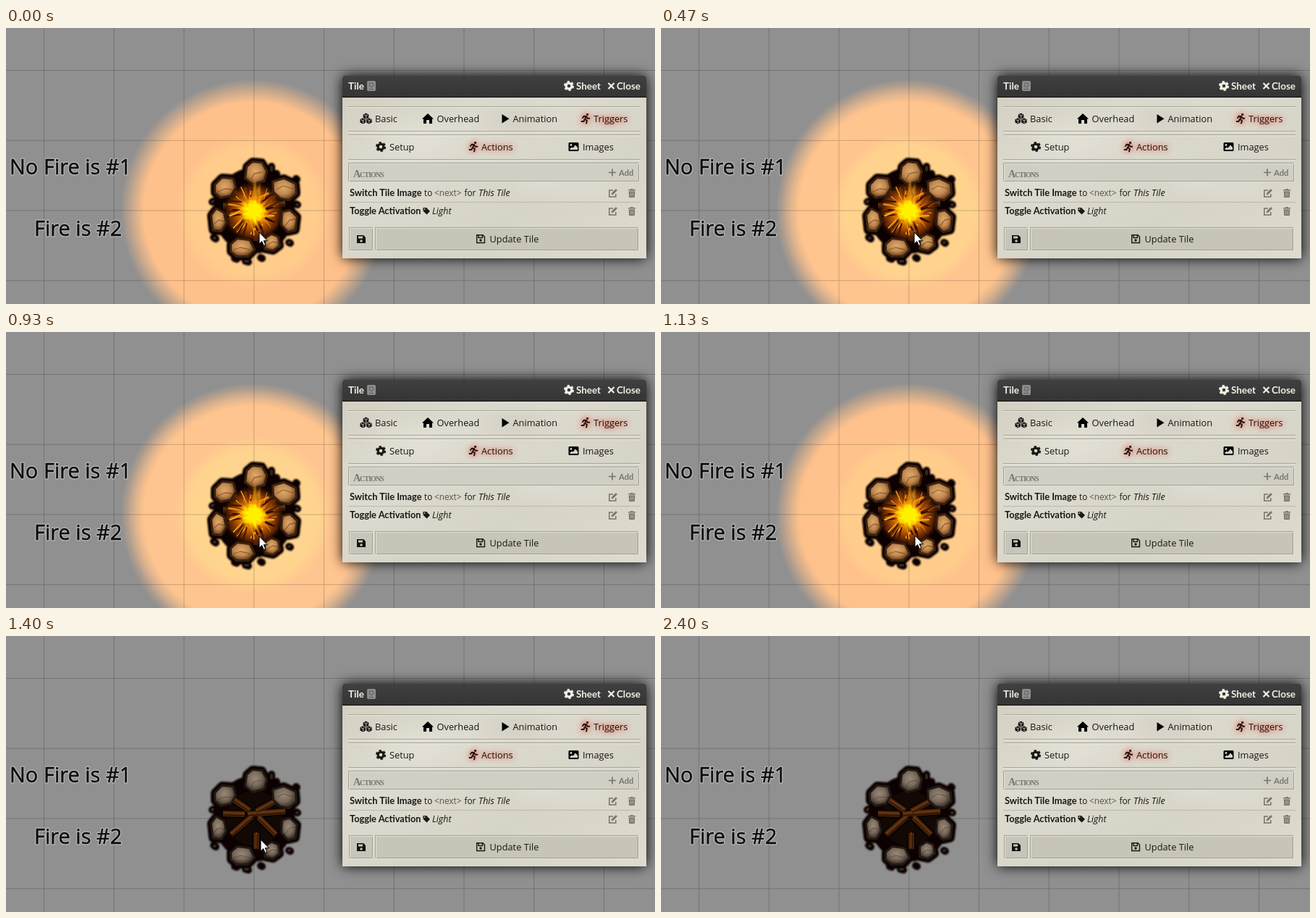
An HTML page for the animation above (3270 ms loop, 897x381 px).

```html
<!DOCTYPE html>
<html lang="en">
<head>
<meta charset="utf-8">
<title>Campfire tile</title>
<style>
html, body { margin: 0; width: 100%; height: 100%; overflow: hidden; background: #909090; }
svg { display: block; width: 897px; height: 381px; }
text { font: 12.8px "Open Sans", "Noto Sans", sans-serif; fill: #191813; white-space: pre; }
#words text { font-size: 29px; fill: inherit; }
.halo { fill: #c8c8c8; stroke: #c8c8c8; stroke-width: 3px; stroke-linejoin: round; opacity: .75; }
.ink { fill: #0e0e0e; stroke: #0e0e0e; stroke-width: .5px; }
.bold { font: 700 12.8px Lato, "Open Sans", sans-serif; }
.head text { font-size: 13.4px; fill: #f0f0e4; }
.row { font-size: 11.8px; }
.ital { font-size: 12.4px; font-style: italic; }
.soft { fill: #55534b; }
.caps { font: 700 14px "Liberation Serif", serif; font-variant: small-caps; letter-spacing: -1px; fill: #78766b; }
.add { font-size: 11.2px; fill: #78766b; }
.glow { filter: drop-shadow(0 0 4px #f21800); }
.line { fill: none; stroke: currentColor; }

.lit, .pulse, .cursor { animation: lit 3270ms step-end infinite; }
.pulse { animation-name: pulse; }
.cursor { animation-name: point; }
@keyframes lit { 0% { opacity: 1; } 42.75%, 100% { opacity: 0; } }
@keyframes pulse {
  0% { opacity: .12; animation-timing-function: steps(7); }
  14.3% { opacity: .52; animation-timing-function: steps(4); }
  22.25% { opacity: 1; animation-timing-function: steps(6); }
  34.5% { opacity: .16; animation-timing-function: steps(4); }
  42.75%, 100% { opacity: 0; }
}
@keyframes point {
  0% { transform: translate(350px, 282px); }
  34.5% { transform: translate(351px, 281px); }
  42.75% { transform: translate(352px, 281px); }
  63.25% { transform: translate(345px, 287px); }
  65.1% { transform: translate(327px, 297px); }
  67.2% { transform: translate(289px, 315px); }
  69.35% { transform: translate(231px, 341px); }
  71.2% { transform: translate(150px, 372px); }
  73.3%, 100% { transform: translate(-40px, 420px); }
}
</style>
</head>
<body>
<svg viewBox="0 0 897 381">
<defs>
  <pattern id="grid" x="52" y="58" width="96.75" height="96.75" patternUnits="userSpaceOnUse">
    <path d="M0 .5H97M.5 0V97" stroke="#000" stroke-opacity=".2"/>
  </pattern>
  <radialGradient id="far"><stop offset=".82" stop-color="#ffc08a"/><stop offset=".91" stop-color="#ffc08a" stop-opacity=".5"/><stop offset="1" stop-color="#ffc08a" stop-opacity="0"/></radialGradient>
  <radialGradient id="farHot"><stop offset=".8" stop-color="#ffcc98" stop-opacity=".75"/><stop offset=".95" stop-color="#ffcc98" stop-opacity="0"/></radialGradient>
  <radialGradient id="near"><stop offset=".82" stop-color="#ffca8c"/><stop offset="1" stop-color="#ffca8c" stop-opacity="0"/></radialGradient>
  <radialGradient id="nearHot"><stop offset=".82" stop-color="#ffdc90"/><stop offset="1" stop-color="#ffdc90" stop-opacity="0"/></radialGradient>
  <radialGradient id="ember"><stop offset=".15" stop-color="#ffb400"/><stop offset=".5" stop-color="#c96204"/><stop offset=".8" stop-color="#642604" stop-opacity=".9"/><stop offset="1" stop-color="#2a1003" stop-opacity="0"/></radialGradient>
  <radialGradient id="cold" cx=".45" cy=".4" r=".62"><stop stop-color="#988876"/><stop offset=".55" stop-color="#7a6a5b"/><stop offset="1" stop-color="#352b24"/></radialGradient>
  <radialGradient id="warm" cx=".45" cy=".42" r=".64"><stop stop-color="#e0aa6c"/><stop offset=".55" stop-color="#c08850"/><stop offset="1" stop-color="#5a3515"/></radialGradient>
  <linearGradient id="paper" x2="1" y2="1"><stop stop-color="#d3d0c3"/><stop offset=".3" stop-color="#dedbd0"/><stop offset=".65" stop-color="#d6d3c7"/><stop offset="1" stop-color="#dfdccf"/></linearGradient>
  <linearGradient id="bar" x2="0" y2="1"><stop stop-color="#404040"/><stop offset="1" stop-color="#343434"/></linearGradient>
  <filter id="soft"><feGaussianBlur stdDeviation="1.1"/></filter>
  <filter id="faint"><feGaussianBlur stdDeviation="12"/></filter>

  <g id="words">
    <text x="5" y="202">No Fire is #1</text>
    <text x="39" y="287">Fire is #2</text>
  </g>

  <g id="stones">
    <path d="M334 192L341 186 353 187 359 198 356 210 341 214 332 207Z"/>
    <path d="M370 213L384 209 399 216 400 228 391 236 380 234 371 226Z"/>
    <path d="M383 255L392 253 401 261 399 278 390 280 382 271Z"/>
    <path d="M359 291L367 286 375 289 377 300 369 306 359 304Z"/>
    <path d="M312 299L320 292 336 294 342 306 334 314 319 314 312 308Z"/>
    <path d="M285 259L291 251 300 256 303 269 297 279 287 278Z"/>
    <path d="M290 217L299 208 313 209 316 220 310 230 297 233 290 227Z"/>
  </g>
  <path id="cracks" d="M338 210L343 201 354 199M374 223L383 218 397 222M386 273L392 265 400 264M361 300L368 295 377 297M315 306L324 303 337 306M287 271L294 265 302 267M293 226L302 222 313 223"/>
  <path id="logs" d="M300 245L330 246M334 246L386 242M315 226L337 241M374 227L346 242M340 249L311 274M349 250L373 274M346 272V294"/>

  <g id="gear" fill="none" stroke="currentColor">
    <circle r="3.9" stroke-width="3.2"/><circle r="5.8" stroke-width="2.6" stroke-dasharray="3.1 2.97"/>
  </g>
  <g id="run" class="line" stroke-width="1.9" stroke-linecap="round" stroke-linejoin="round">
    <circle cx="2.6" cy="-5.6" r=".7"/>
    <path d="M-4-1L-2.5-3.2 1-3 -.8 1 2 3 1 6.5M-1.4 1.4L-2.6 4H-5.4M1-2.6L2.8-.3H5.3"/>
  </g>
  <path id="hex" d="M0-4L3.8-2V2.2L0 4.2-3.8 2.2V-2Z"/>
  <g id="cube"><use href="#hex" fill="currentColor"/><path d="M-2.2-1.6L0-.5 2.2-1.6M.2 .4V3" fill="none" stroke="#d9d6ca" stroke-width="1"/></g>
  <g id="edit" class="line" stroke-width="1.5">
    <path d="M0-4H-5.2V5H3.8V1"/><path d="M-2 2L-1.5-.3 4-5.6 5.6-4 .2 1.5Z" fill="currentColor" stroke-width=".6"/>
  </g>
  <g id="trash" fill="currentColor"><path d="M-5-5H-2L-1.3-6H1.3L2-5H5V-3.4H-5ZM-4.3-2.6H4.3L3.8 6H-3.8Z"/><path d="M-1.9-1V4.5M0-1V4.5M1.9-1V4.5" stroke="#d9d6ca" stroke-width=".6"/></g>
</defs>

<rect width="897" height="381" fill="#909090"/>

<g class="lit">
  <circle cx="341" cy="253" r="183" fill="url(#far)"/>
  <circle cx="342" cy="253" r="106" fill="url(#near)"/>
</g>
<g class="pulse">
  <circle cx="341" cy="253" r="183" fill="url(#farHot)"/>
  <circle cx="342" cy="253" r="109" fill="url(#nearHot)"/>
</g>
<rect width="897" height="381" fill="url(#grid)"/>

<!-- campfire -->
<g filter="url(#soft)" fill="#080504" stroke="#080504">
  <ellipse cx="343" cy="252" rx="56" ry="59"/>
  <use href="#stones" stroke-width="14" stroke-linejoin="round"/>
  <path d="M367 191V197M374 201V203M331 322L335 323M316 318L319 319M391 296L393 297M352 317L354 318M285 240L287 239M401 243L403 244M287 289L290 291M401 208L402 209" stroke-width="10" stroke-linecap="round"/>
</g>
<path d="M367 192V196M331 322L334 322M391 296L392 296M285 240L286 239M402 244L403 244M288 290L289 290" stroke="#2f241c" stroke-width="4" stroke-linecap="round"/>
<ellipse cx="343" cy="252" rx="39" ry="38" fill="#120905"/>
<use href="#logs" stroke="#080301" stroke-width="12"/>
<use href="#logs" stroke="#452109" stroke-width="8"/>
<use href="#logs" stroke="#66350f" stroke-width="2.5" transform="translate(0 -1)"/>
<use href="#logs" stroke="#231005" stroke-width="1" transform="translate(1 2)"/>

<g class="lit">
  <ellipse cx="342" cy="254" rx="43" ry="42" fill="url(#ember)"/>
  <g id="streaks"></g>
</g>

<g stroke-linejoin="round">
  <use href="#stones" fill="#1f1914" stroke="#1f1914" stroke-width="6"/>
  <use href="#stones" fill="url(#cold)"/>
  <use href="#cracks" fill="none" stroke="#3b3027" stroke-opacity=".45" stroke-width="1.2"/>
</g>
<g class="lit" stroke-linejoin="round">
  <use href="#stones" fill="#39200c" stroke="#39200c" stroke-width="6"/>
  <use href="#stones" fill="url(#warm)"/>
  <use href="#cracks" fill="none" stroke="#6d3f18" stroke-opacity=".6" stroke-width="1.3"/>
  <path d="M339 240L344 207 347 224 351 214 352 240Z" fill="#ffae18" opacity=".6" filter="url(#soft)"/>
  <g id="flame"></g>
</g>

<use href="#words" class="halo"/>
<use href="#words" class="ink"/>

<!-- window -->
<rect x="465" y="66" width="420" height="252" rx="5" fill="#222" style="filter:drop-shadow(0 0 9px #000)"/>
<path d="M465 95H885V318H465Z" fill="url(#paper)"/>
<g filter="url(#faint)" opacity=".35">
  <ellipse cx="560" cy="150" rx="50" ry="18" fill="#eeece2"/>
  <ellipse cx="770" cy="215" rx="70" ry="18" fill="#eeece2"/>
  <ellipse cx="700" cy="125" rx="45" ry="14" fill="#bfbbae"/>
</g>
<path d="M465 96V71Q465 66 470 66H880Q885 66 885 71V96Z" fill="url(#bar)"/>
<path d="M465 95.5H885" stroke="#0c0c0c"/>

<g class="head" color="#f0f0e4">
  <text class="bold" x="473" y="85">Tile</text>
  <rect x="499" y="73" width="12" height="14" rx="2" fill="#8c8c88"/>
  <circle cx="505" cy="78.5" r="2.8" fill="none" stroke="#5c5c58"/>
  <path d="M502 84.5H508" stroke="#5c5c58"/>
  <use href="#gear" x="778" y="80"/>
  <text class="bold" x="788" y="85">Sheet</text>
  <path class="line" d="M832.5 76L840.5 84M840.5 76L832.5 84" stroke-width="2.2"/>
  <text class="bold" x="844" y="85">Close</text>
</g>

<path d="M473 108.5H877M473 142.5H877M473 147.5H877M473 181.5H877" stroke="#a5a296"/>
<path d="M473 109.5H877M473 143.5H877M473 148.5H877M473 182.5H877" stroke="#ebe9df"/>

<g color="#191813">
  <use href="#cube" x="497.5" y="121.5"/><use href="#cube" x="493.2" y="128.3"/><use href="#cube" x="501.8" y="128.3"/>
  <text x="510" y="130">Basic</text>
  <path d="M575 125.5L583 118 591 125.5H589V132H585V127H581V132H577V125.5Z"/>
  <text x="595.5" y="130">Overhead</text>
  <path d="M685.5 119L695.5 125.2 685.5 131.5Z"/>
  <text x="700.5" y="130">Animation</text>
  <g class="glow"><use href="#run" x="801" y="125"/><text x="812" y="130">Triggers</text></g>

  <use href="#gear" x="518" y="164"/>
  <text x="530" y="169">Setup</text>
  <g class="glow"><use href="#run" x="646" y="164"/><text x="657" y="169">Actions</text></g>
  <rect x="777.5" y="158" width="14" height="12" rx="1.5"/>
  <circle cx="781" cy="161.5" r="1.4" fill="#d9d6ca"/>
  <path d="M779.5 168V166.5L782 164.5 783.5 165.8 787 161.5 790 165V168Z" fill="#d9d6ca"/>
  <text x="797" y="169">Images</text>
</g>

<!-- boxes with a grooved edge -->
<g fill="#c7c5b8" stroke="#a19f93">
  <rect x="473.5" y="186.5" width="402" height="26" fill="#d1cfc3"/>
  <rect x="474.5" y="275.5" width="33" height="32"/>
  <rect x="510.5" y="275.5" width="364" height="32"/>
</g>
<g fill="none" stroke="#e6e4da">
  <rect x="474.5" y="187.5" width="400" height="24"/>
  <rect x="475.5" y="276.5" width="31" height="30"/>
  <rect x="511.5" y="276.5" width="362" height="30"/>
</g>
<path d="M475 211.5H874.5V188M476 306.5H506.5V277M512 306.5H873.5V277" fill="none" stroke="#a19f93"/>
<path d="M473 212.5H875.5V186M474 307.5H507.5V275M510 307.5H874.5V275" fill="none" stroke="#e6e4da"/>
<text class="caps" x="480" y="206">Actions</text>
<path d="M833 199.5H843M838 194.5V204.5" stroke="#78766b" stroke-width="1.7"/>
<text class="bold add" x="847" y="204">Add</text>

<text class="bold" x="475" y="232">Switch Tile Image</text>
<text class="row" x="578" y="232">to</text>
<text class="row soft" x="592" y="232">&lt;next&gt;</text>
<text class="row" x="633.5" y="232">for</text>
<text class="ital" x="653" y="232">This Tile</text>
<path d="M473 240.5H877" stroke="#bbb8ab"/>
<text class="bold" x="475" y="257">Toggle Activation</text>
<path d="M576.5 248H581L586 253 581.5 257.5 576.5 252.5Z" fill="#191813"/>
<circle cx="578.6" cy="250" r=".9" fill="#d9d6ca"/>
<text class="ital" x="589" y="257">Light</text>
<g color="#76746b">
  <use href="#edit" x="839" y="228"/><use href="#trash" x="865" y="228"/>
  <use href="#edit" x="839" y="253"/><use href="#trash" x="865" y="253"/>
</g>

<path d="M485 286H494L497 289V297H485Z" fill="#111"/>
<path d="M487 287.5H493V290.5H487Z" fill="#c7c5b8"/><circle cx="491" cy="294" r="1.7" fill="#c7c5b8"/>
<path d="M650.7 285.7H659L661.5 288.2V296.5H650.7ZM653 286V289.5H658.5V286" fill="none" stroke="#191813" stroke-width="1.4"/>
<circle cx="656" cy="293" r="1.7" fill="#191813"/>
<text x="668.5" y="296">Update Tile</text>

<g class="cursor">
  <path d="M0 0V16L3.7 12.6 6.2 18.4 8.7 17.3 6.2 11.7H11.3Z" fill="#fff" stroke="#000"/>
</g>
</svg>
<script>
const NS = "http://www.w3.org/2000/svg";
const centre = { x: 342, y: 253 };
let seed = 11;
const rand = (a, b) => {
  seed = seed * 16807 % 2147483647;
  return a + (b - a) * seed / 2147483647;
};
const at = (angle, r) =>
  (centre.x + r * Math.cos(angle)).toFixed(1) + " " + (centre.y + r * Math.sin(angle)).toFixed(1);

function addPath(parent, attrs) {
  const path = document.createElementNS(NS, "path");
  for (const name in attrs) path.setAttribute(name, attrs[name]);
  document.getElementById(parent).append(path);
}

// Jagged star with n spikes
function star(n, inner, outer) {
  const points = [];
  for (let i = 0; i < 2 * n; i++) {
    points.push(at(i * Math.PI / n, (i % 2 ? inner : outer) * rand(.75, 1.2)));
  }
  return "M" + points.join("L") + "Z";
}

const streakColors = ["#2c1003", "#e88c10", "#7c3408", "#f5a81c", "#3a1503"];
for (let i = 0; i < 56; i++) {
  const angle = i * Math.PI / 28 + rand(-.12, .12);
  addPath("streaks", {
    d: `M${at(angle, rand(12, 24))}L${at(angle + rand(-.25, .25), rand(27, 38))}`,
    stroke: streakColors[i % 5],
    "stroke-width": rand(.9, 2.8).toFixed(1)
  });
}
addPath("flame", { d: star(17, 14, 23), fill: "#ff9c08", opacity: .75, filter: "url(#soft)" });
addPath("flame", { d: star(13, 13, 18), fill: "#ffd800", filter: "url(#soft)" });
addPath("flame", { d: star(9, 10, 14), fill: "#fff000" });
</script>
</body>
</html>
```
